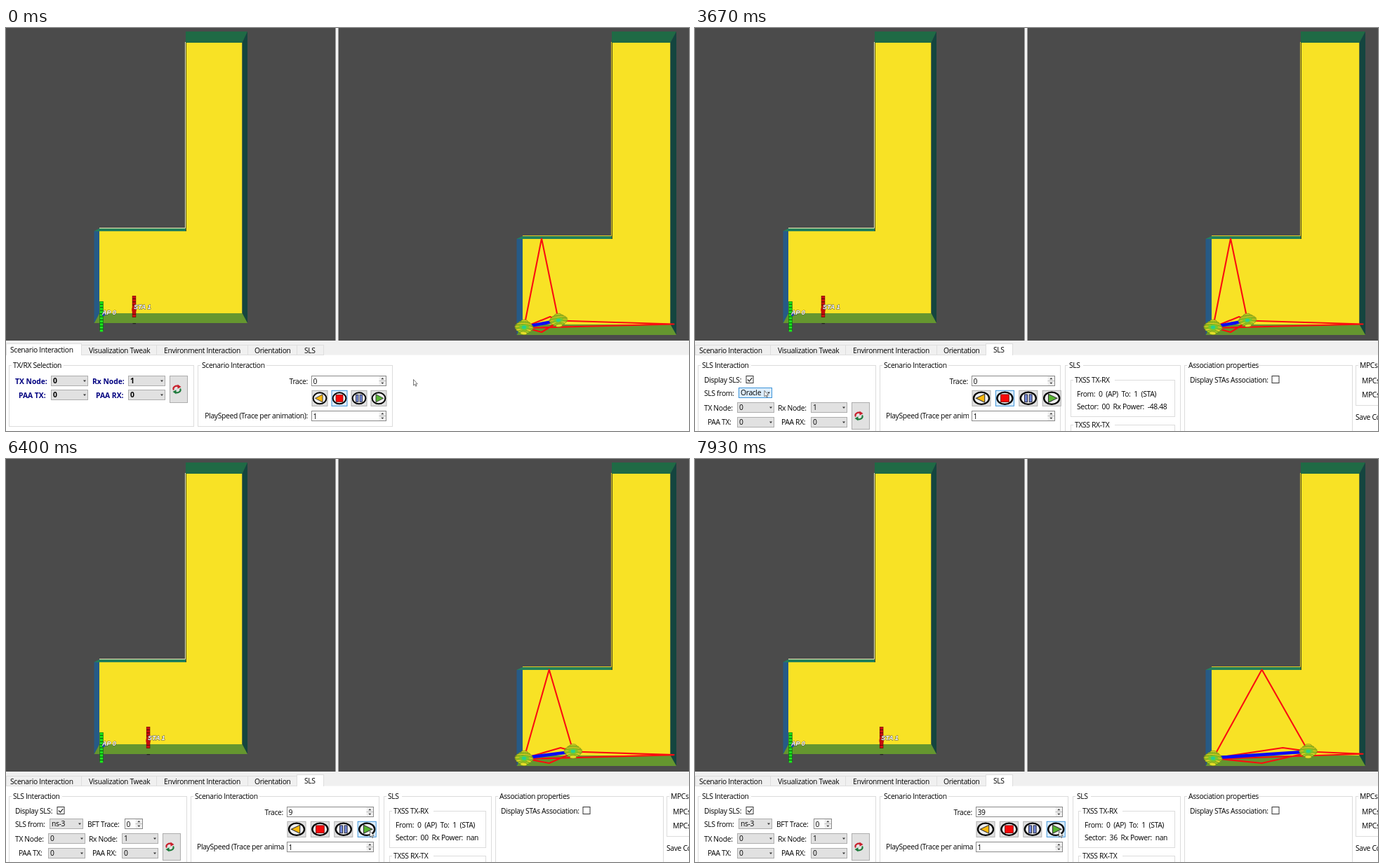
Recreate the animation shown at these times as an HTML page. Size 973 by 575 pixels, loop 8000 ms.

```html
<!DOCTYPE html>
<html lang="en">
<head>
<meta charset="utf-8">
<title>Beamforming scenario viewer</title>
<style>
html, body { margin: 0; width: 100%; height: 100%; overflow: hidden; background: #fff; }
#stage { display: block; width: 100vw; height: 100vh; }
text { font: 10.3px "Open Sans", "Noto Sans", sans-serif; letter-spacing: -.32px; white-space: pre; fill: #000; }
.bold { font-weight: 700; letter-spacing: 0; }
.navy { fill: #000080; }
.tag { font: italic 700 9px "Liberation Sans", Arial, sans-serif; letter-spacing: 0; fill: #fff; paint-order: stroke; stroke: #444; stroke-width: .8px; }
.frame { fill: none; stroke: #dcdcdc; }
.ctl { fill: #e1e1e1; stroke: #adadad; }
.field { fill: #fff; stroke: #8a8a8a; }
.hot > .ctl { fill: #dcedfb; stroke: #3c93d8; }
.ray { fill: none; stroke: #fa0d10; stroke-width: 2.1; stroke-linejoin: round; }
</style>
</head>
<body>
<svg id="stage" viewBox="0 0 973 575" preserveAspectRatio="none"></svg>
<script>
const rect = (x, y, w, h, attr) => `<rect x="${x}" y="${y}" width="${w}" height="${h}" ${attr}/>`;
const box = (x, y, w, h, cls) => rect(x + .5, y + .5, w - 1, h - 1, `class="${cls}"`);
const poly = (points, fill) => `<polygon points="${points}" fill="${fill}"/>`;
const text = (x, y, s, cls = '', attr = '') => `<text x="${x}" y="${y}" class="${cls}" ${attr}>${s}</text>`;
const group = (id, body, attr = '') => `<g id="${id}" ${attr}>${body}</g>`;

// ---------- 3D views ----------
function room(r) {
  const { x0, x1, x2, top, mid, bot, ox, oy, edge } = r;
  return poly(`${x1},21 ${x2},21 ${x2},${bot} ${x0},${bot} ${x0},${mid} ${x1},${mid}`, '#f8e225')
    + poly(`${x1},5 ${x2 + ox},5 ${x2},21 ${x1},21`, '#1f6a45')
    + poly(`${x2 + ox},5 ${x2 + ox},${bot + oy} ${x2},${bot} ${x2},21`, '#14453f')
    + poly(`${x0},${bot} ${x2},${bot} ${x2 + ox},${bot + oy} ${x0 - ox},${bot + oy}`, '#65962f')
    + poly(`${x0 - ox},${mid} ${x0},${top} ${x0},${bot} ${x0 - ox},${bot + oy}`, '#265a86')
    + poly(`${x0 - ox},${mid} ${x0},${top} ${x1},${top} ${x1},${mid}`, '#23805b')
    + `<path d="M${x0} ${top - .5}H${x1 - .5}V20" fill="none" stroke="${edge}"/>`
    + `<path d="M${x1 + .5} 21V${mid}" stroke="#4a4a20"/>`;
}

function antenna(x, y, n, color, dark) {
  let s = rect(x - 2.7, y, 5.4, n * 4.4, `fill="${dark}"`);
  for (let i = 0; i < n; i++) s += rect(x - 2.2, y + i * 4.4 + .5, 4.4, 3.3, `fill="${color}"`);
  return s;
}

function lobe(tilt) {
  let s = '';
  for (let i = -4; i <= 4; i++) {
    const w = 13.5 * Math.cos(i * .3);
    const fill = i % 2 ? '#9ccb22' : '#e6e02a';
    s += `<ellipse cy="${i * 2.1}" rx="${w}" ry="2.3" fill="${fill}" stroke="#6d8412" stroke-width=".7"/>`;
  }
  s += '<ellipse rx="7" ry="4.2" fill="#74c92e"/><ellipse rx="3.2" ry="2.4" fill="#27cf8e"/>';
  return `<g transform="rotate(${tilt})">${s}</g>`;
}

const views = rect(0, 0, 973, 446, 'fill="#4b4b4b"') + rect(469.5, 0, 4, 446, 'fill="#f3f3f3"')
  + room({ x0: 133, x1: 256, x2: 336.5, top: 286, mid: 290, bot: 407, ox: 7.5, oy: 14, edge: '#f2efb4' })
  + room({ x0: 736, x1: 863, x2: 946.5, top: 297, mid: 301, bot: 423, ox: 8.5, oy: 15, edge: '#e6cb24' })
  + antenna(136, 390, 9.5, '#1be51b', '#0b5a10')
  + rect(137.5, 406, 3, 5, 'fill="#2038c8"') + text(137, 409, 'AP 0', 'tag')
  + group('station', antenna(0, 382, 7, '#d01010', '#5c0808')
    + '<ellipse cy="402" rx="3.2" ry="4.2" fill="#c40c0c"/>'
    + rect(-2, 421, 4.5, 1.2, 'fill="#222"') + text(-.5, 400.5, 'STA 1', 'tag'))
  + '<path id="rays" class="ray"/><path id="direct" stroke="#0b0bf4" stroke-width="4.6"/>'
  + `<g transform="translate(738 427)">${lobe(4)}</g>` + group('ball', group('tilt', lobe(0)));

// ---------- widgets ----------
function frame(x, y, w, h, title, titleW) {
  return box(x, y, w, h, 'frame') + rect(x + 4, y - 2, titleW + 4, 5, 'fill="#fff"') + text(x + 6, y + 4, title);
}
const arrow = (x, y, s) => poly(`${x - 2},${y} ${x + 2},${y} ${x},${y + 2.4 * s}`, '#333');
const combo = (x, y, w, s, cls, id) => group(id || '', box(x, y, w, 15, 'ctl')
  + text(x + 3, y + 11.3, s, cls) + arrow(x + w - 5, y + 6.5, 1));
function spin(x, y, w, s, id) {
  const bx = x + w - 10.5;
  return box(x, y, w, 15, 'field') + text(x + 2.5, y + 11.5, s, '', id ? `id="${id}"` : '')
    + rect(bx, y + 1, 9.5, 13, 'fill="#eee"') + rect(bx, y + 7, 9.5, 1, 'fill="#bbb"')
    + arrow(bx + 4.8, y + 5.3, -1) + arrow(bx + 4.8, y + 9.7, 1);
}
const check = (x, y, on) => box(x, y, 11, 11, 'field" style="stroke:#333')
  + (on ? `<path d="M${x + 2.5} ${y + 5.5}l2.3 2.6 4-5" fill="none" stroke="#222" stroke-width="1.2"/>` : '');
const refresh = (x, y) => box(x, y, 26, 39, 'ctl') + `<g transform="translate(${x + 10.5} ${y + 19.5})" fill="none" stroke-width="2">
  <path d="M-4.6 1A4.6 4 0 0 1 2.5 -3.8" stroke="#c8202c"/><path d="M4.6 -1A4.6 4 0 0 1 -2.5 3.8" stroke="#1f7a3c"/>
  <path d="M1-7L6-3.5 1-.8z" fill="#c8202c" stroke="none"/><path d="M-1 7L-6 3.5-1 .8z" fill="#1f7a3c" stroke="none"/></g>`;

const icons = {
  back: '<path d="M4-5.5V5.5L-6.5 0z" fill="#fdb90c" stroke="#333" stroke-width=".9"/>',
  stop: rect(-5, -5, 10, 10, 'fill="#f50808" stroke="#500" stroke-width=".6"'),
  pause: rect(-4.5, -5, 3.4, 10, 'fill="#7288d8" stroke="#223" stroke-width=".8"') + rect(1.1, -5, 3.4, 10, 'fill="#7288d8" stroke="#223" stroke-width=".8"'),
  play: '<path d="M-4-5.5V5.5L6.5 0z" fill="#57b531" stroke="#333" stroke-width=".9"/>'
};
function player(x, step, w, prefix) {
  return Object.keys(icons).map((name, i) => group(prefix + name,
    box(-w / 2, -11.5, w, 23, 'ctl')
    + `<g transform="scale(${w / 23} ${w > 23 ? 1.08 : 1})">`
    + '<ellipse rx="9.4" ry="8" fill="#eee" stroke="#050505" stroke-width="2"/>' + icons[name] + '</g>',
    `transform="translate(${x + i * step} 528.3)" ${name === 'stop' ? 'class="hot"' : ''}`)).join('');
}

// ---------- pages ----------
const pageScenario = frame(4, 481, 264, 88, 'TX/RX Selection', 70)
  + text(13, 507.5, 'TX Node:', 'bold navy') + combo(64, 496, 53, '0', 'bold')
  + text(123, 507.5, 'Rx Node:', 'bold navy') + combo(174, 496, 53, '1', 'bold')
  + text(18, 528, 'PAA TX:', 'bold navy') + combo(64, 516, 53, '0', 'bold')
  + text(128, 528, 'PAA RX:', 'bold navy') + combo(174, 516, 53, '0', 'bold')
  + refresh(233, 496)
  + frame(273, 481, 278, 88, 'Scenario Interaction', 90)
  + text(430, 507.5, 'Trace:', '', 'text-anchor="end"') + spin(435, 496, 107, '0')
  + player(447, 28, 23, 'p0')
  + text(430, 557, 'PlaySpeed (Trace per animation):', '', 'text-anchor="end"') + spin(435, 546, 107, '1');

// k: prefix, source: combo entry, dx/gx: layout shifts caused by the extra field
function pageSls(k, source, dx, gx, spinW, sector) {
  return frame(4, 481, 254, 110, 'SLS Interaction', 68)
    + text(13, 506, 'Display SLS:') + check(72.5, 496, true)
    + text(13, 525, 'SLS from:') + combo(62, 513, 48, source, '', k + 'source')
    + (gx ? group(k + 'bft', text(116, 525, 'BFT Trace:') + spin(169, 513, 26, '0')) : '')
    + text(13, 546, 'TX Node:') + combo(60, 534, 53, '0')
    + text(118, 546, 'Rx Node:') + combo(165, 534, 52, '1')
    + text(18, 566, 'PAA TX:') + combo(60, 555, 53, '0')
    + text(123, 566, 'PAA RX:') + combo(165, 555, 52, '0')
    + refresh(223, 534)
    + frame(263, 481, 258 + gx, 110, 'Scenario Interaction', 90)
    + text(389 + dx, 507.5, 'Trace:', '', 'text-anchor="end"') + spin(394 + dx, 496, spinW, '0', k + 'trace')
    + player(408 + dx, 33.4, 27, k)
    + `<svg x="272" y="543" width="${118 + dx}" height="20">${text(0, 14, 'PlaySpeed (Trace per animation):')}</svg>`
    + spin(394 + dx, 546, spinW, '1')
    + frame(527 + gx, 481, 165 - gx, 110, 'SLS', 18)
    + frame(535 + gx, 502, 149 - gx, 53, 'TXSS TX-RX', 55)
    + text(544 + gx, 526, 'From:  0  (AP)  To:  1  (STA)')
    + text(544 + gx, 544, sector, '', `id="${k}sector"`)
    + frame(535 + gx, 566, 149 - gx, 40, 'TXSS RX-TX', 55)
    + frame(697, 481, 240, 110, 'Association properties', 97)
    + text(705, 506, 'Display STAs Association:') + check(821.5, 496, false)
    + frame(941, 481, 60, 58, 'MPCs', 24)
    + text(950, 507, 'MPCs') + text(950, 527, 'MPCs') + text(941, 559, 'Save Co');
}

const tabs = [['Scenario Interaction', 0, 6], ['Visualization Tweak', 107, 118],
  ['Environment Interaction', 214, 225], ['Orientation', 344, 354], ['SLS', 414, 425]];
const tabBar = rect(0, 446, 973, 20.5, 'fill="#f0f0f0"') + tabs.map(([name, x, tx], i) => {
  const w = (i < 4 ? tabs[i + 1][1] : 452) - x;
  return rect(x + .5, 452.5, w, 14, `id="tab${i}" stroke="#dedede"`) + text(tx, 463.6, name, '', `id="name${i}"`);
}).join('') + rect(0, 467, 973, 108, 'fill="#fff"');

document.getElementById('stage').innerHTML = views + tabBar
  + group('page0', pageScenario)
  + group('page1', pageSls('a', 'Oracle', 0, 0, 119, 'Sector:  00  Rx Power:  -48.48'))
  + group('page2', pageSls('b', 'ns-3', 6, 11, 124, ''))
  + group('cursor', '<path d="M.5.5V9L2.4 7.2 3.8 10.2 5 9.6 3.7 6.8H6.2z" fill="#fff" stroke="#555" stroke-width=".8"/>');

// ---------- animation ----------
const LOOP = 8000, STEP = 1000 / 15;
const $ = id => document.getElementById(id);
const path = [[0, 580, 501], [400, 520, 494], [870, 403, 468], [1000, 405, 463], [1200, 424, 458], [1400, 436, 456],
  [2800, 436, 456], [3130, 128, 506], [3200, 128, 506], [3800, 90, 520], [4570, 90, 520], [5330, 500, 530],
  [5400, 500, 530], [5600, 518, 530.5]];
const counter = [[5830, 0], [6400, 9.2], [7130, 23.3], [7930, 39.3]];

function at(keys, t) {
  const i = keys.findIndex(k => k[0] > t);
  if (i === 0) return keys[0].slice(1);
  if (i < 0) return keys[keys.length - 1].slice(1);
  const a = keys[i - 1], b = keys[i], f = (t - a[0]) / (b[0] - a[0]);
  return a.slice(1).map((v, j) => v + (b[j + 1] - v) * f);
}
const between = (t, a, b) => t >= a && t < b;
const show = (id, on) => $(id).setAttribute('display', on ? 'inline' : 'none');
const place = (id, x, y) => $(id).setAttribute('transform', `translate(${x} ${y})`);
const hot = (id, on) => $(id).setAttribute('class', on ? 'hot' : '');

function draw(t) {
  const page = t < 2595 ? 0 : t < 4060 ? 1 : 2;
  for (let i = 0; i < 3; i++) show('page' + i, i === page);
  tabs.forEach((_, i) => {
    const on = i === (page ? 4 : 0);
    const hover = i === 3 && between(t, 990, 1130) || i === 4 && between(t, 1130, 2595);
    $('tab' + i).setAttribute('fill', on ? '#fff' : hover ? '#d8eaf9' : '#f0f0f0');
    $('tab' + i).setAttribute('y', on ? 450.5 : 452.5);
    $('tab' + i).setAttribute('height', on ? 17 : 14);
    $('name' + i).setAttribute('y', on ? 462.8 : 463.8);
  });
  hot('asource', t >= 3450);
  hot('bsource', t < 4720);
  hot('bstop', t < 5795);
  hot('bplay', t >= 5460);

  const n = Math.floor(at(counter, t)[0] + .01);
  const d = n ? 1.2 + 2.19 * n : 0;
  const scan = between(t, 6120, 7260);
  $('btrace').textContent = n;
  $('bsector').textContent = `Sector:  ${scan ? '00' : '36'}  Rx Power:  nan`;

  const x = 787 + d, mid = 763 + .514 * d, far = 951.5, fy = 422.5 - .02 * d;
  place('station', 182.5 + .96 * d, 0);
  place('ball', x, 417);
  $('tilt').setAttribute('transform', `rotate(${n ? 0 : -7}) scale(.98 ${n ? .95 : .9})`);
  $('rays').setAttribute('d', `M738 427L${mid} 300.5L${x} 417M738 427L${mid} 434L${x} 419`
    + `M738 427L${775 + .72 * d} 412L${x} 417M738 428L${far} ${fy}L${x} 417.5`);
  $('direct').setAttribute('d', `M738 426.5L${x} 417.5`);

  place('cursor', ...at(path, t));
}

function tick() {
  const t = performance.now() % LOOP;
  draw(Math.floor((t + 5) / STEP) * STEP);
  requestAnimationFrame(tick);
}
tick();
</script>
</body>
</html>
```
